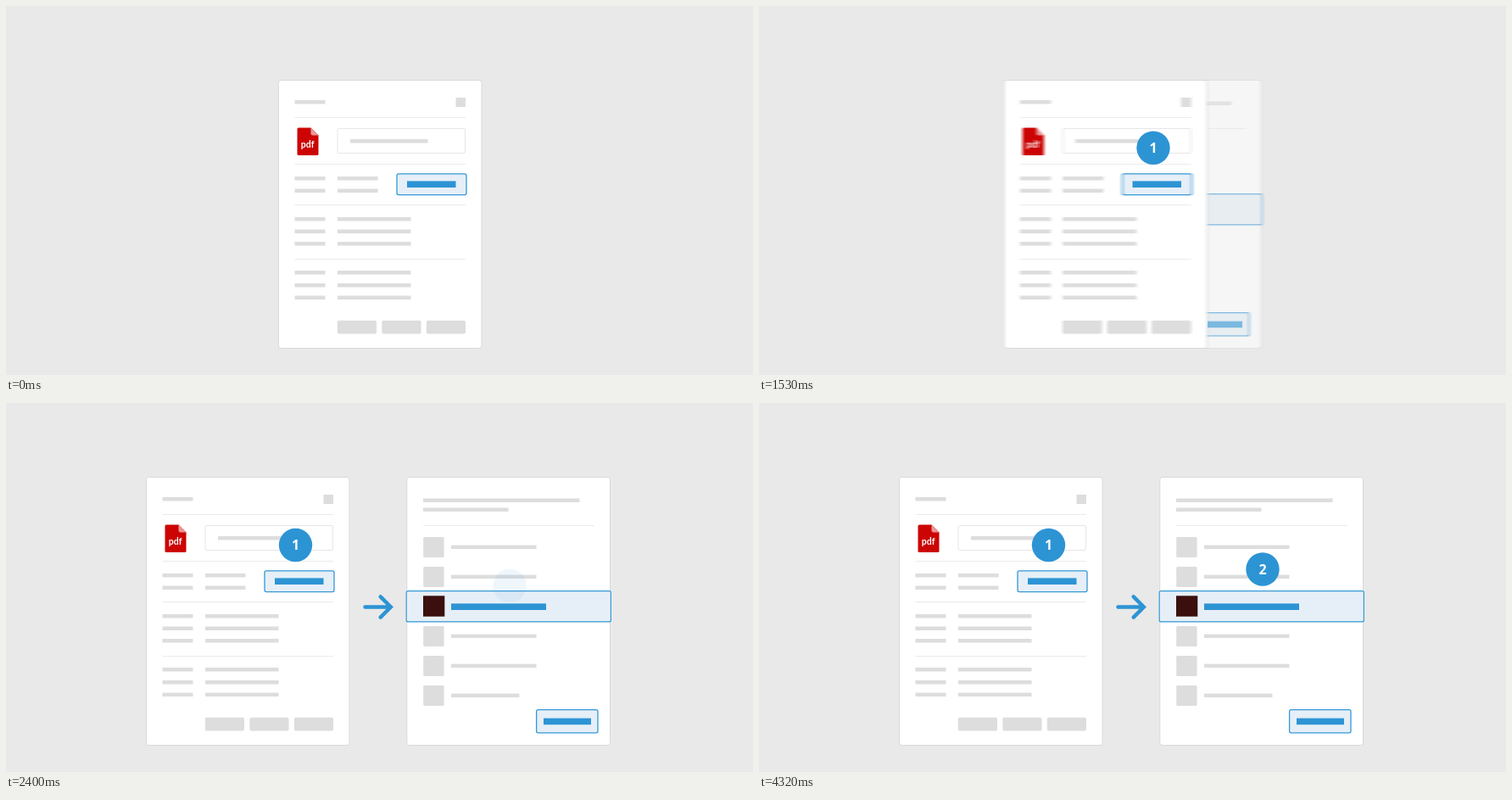
Write an HTML page with a canvas that moves like this. It is 881 by 435 pixels and loops after 4.5 s.

```html
<!DOCTYPE html>
<html lang="en">
<head>
<meta charset="utf-8">
<title>Choose an app for a file</title>
<style>
html, body { margin: 0; width: 100%; height: 100%; overflow: hidden; background: #e9e9e9; }
canvas { display: block; }
</style>
</head>
<body>
<canvas id="stage" width="881" height="435"></canvas>
<script>
const W = 881, H = 435, LOOP = 4500, TICK = 30;
const BG = '#e9e9e9', GREY = '#dddddd', RULE = '#ebebeb';
const BLUE = '#2d94d4', PALE = '#e6eff7';
const ctx = document.getElementById('stage').getContext('2d');

function layer(paint) {
  const c = document.createElement('canvas');
  c.width = W;
  c.height = H;
  const g = c.getContext('2d');
  if (paint) paint(g);
  return { canvas: c, g };
}

// Shapes are given by their left, top, right and bottom edges.
function bar(g, x1, y1, x2, y2, color = GREY) {
  g.fillStyle = color;
  g.fillRect(x1, y1, x2 - x1, y2 - y1);
}

function box(g, x1, y1, x2, y2, r, fill, stroke, lw = 1) {
  g.beginPath();
  g.roundRect(x1, y1, x2 - x1, y2 - y1, r);
  if (fill) {
    g.fillStyle = fill;
    g.fill();
  }
  if (stroke) {
    g.strokeStyle = stroke;
    g.lineWidth = lw;
    g.stroke();
  }
}

function poly(g, color, ...pts) {
  g.beginPath();
  for (let i = 0; i < pts.length; i += 2) g.lineTo(pts[i], pts[i + 1]);
  g.closePath();
  g.fillStyle = color;
  g.fill();
}

function fileIcon(g) {
  g.beginPath();
  g.moveTo(345, 143.5);
  g.lineTo(359.5, 143.5);
  g.lineTo(368.5, 152.5);
  g.lineTo(368.5, 174.5);
  g.arcTo(368.5, 176, 367, 176, 1.5);
  g.lineTo(345, 176);
  g.arcTo(343.5, 176, 343.5, 174.5, 1.5);
  g.lineTo(343.5, 145);
  g.arcTo(343.5, 143.5, 345, 143.5, 1.5);
  g.fillStyle = '#cc0404';
  g.fill();
  poly(g, '#ea9696', 359.5, 143.5, 368.5, 152.5, 361, 152.5, 359.5, 151);
  g.fillStyle = '#fff';
  g.font = 'bold 10.5px Lato, "Open Sans", sans-serif';
  g.textAlign = 'center';
  g.fillText('pdf', 355.7, 167);
}

// The details card, at its opening place
const card = layer(g => {
  box(g, 321.5, 87.5, 561, 403.5, 3, '#fff', '#d9d9d9');
  bar(g, 340.5, 111, 376.5, 115.5);
  bar(g, 530.5, 108, 542, 119);
  for (const y of [131, 186, 234, 298]) bar(g, 340.5, y, 542, y + 1, RULE);
  fileIcon(g);
  box(g, 391, 144.5, 541.5, 173.5, 1.5, null, '#e6e6e6');
  bar(g, 406, 157, 497.5, 161.5);
  const row = (y, right) => {
    bar(g, 340.5, y, 376.5, y + 4.5);
    bar(g, 391, y, right, y + 4.5);
  };
  for (const y of [201, 215.5]) row(y, 438.5);
  for (const y of [249, 263.5, 278, 312, 327, 341.5]) row(y, 477.5);
  for (let i = 0; i < 3; i++) {
    const x = 390.8 + i * 52.5;
    box(g, x, 370.8, x + 46.2, 386.6, 2, GREY);
  }
  box(g, 461, 197.8, 543, 222.6, 2, PALE, '#3598d8', 1.3);
});

// The app list, at its closing place
const panel = layer(g => {
  box(g, 472.8, 87.5, 712.5, 403.5, 3, '#fff', '#d9d9d9');
  bar(g, 492, 112.5, 676.5, 117);
  bar(g, 492, 123.5, 592.5, 128);
  bar(g, 492, 144, 693.5, 145, RULE);
  for (let i = 0; i < 6; i++) {
    if (i === 2) continue;
    const y = 158 + i * 35;
    box(g, 492.2, y, 516.6, y + 24, 1.5, GREY);
    bar(g, 525, y + 9.6, i === 5 ? 605.5 : 625.5, y + 14);
  }
  box(g, 472.2, 221.7, 713.4, 257.9, 2, PALE, '#3598d8', 1.2);
  bar(g, 492, 227.3, 517.3, 251.7, '#3a0f0e');
  box(g, 625.6, 361.6, 698, 388.8, 2, PALE, '#3598d8', 1.3);
});

const SLIDE = { start: 1181, length: 808, a: 0.85, b: 0.18 };
const CARD_DX = -156, PANEL_DX = 151.5, ARROW_DX = 104;
const clamp = v => Math.min(1, Math.max(0, v));

// Cubic bezier ease with handles (a, 0) and (b, 1)
function slide(t) {
  const { start, length, a, b } = SLIDE;
  const x = clamp((t - start) / length);
  if (x === 0 || x === 1) return x;
  let lo = 0, hi = 1, s;
  for (let i = 0; i < 30; i++) {
    s = (lo + hi) / 2;
    const q = 1 - s;
    if (3 * a * q * q * s + 3 * b * q * s * s + s * s * s < x) lo = s;
    else hi = s;
  }
  return s * s * (3 - 2 * s);
}

function panelAlpha(t) {
  const u = clamp((t - 1350) / 510);
  return 1 - (1 - u) * (1 - u);
}

function arrow(g, dx) {
  g.save();
  g.translate(dx, 0);
  g.strokeStyle = BLUE;
  g.lineWidth = 4.5;
  g.lineCap = 'round';
  g.beginPath();
  g.moveTo(423.5, 240.5);
  g.lineTo(453, 240.5);
  g.moveTo(441.7, 228.3);
  g.lineTo(453.8, 240.5);
  g.lineTo(441.7, 252.7);
  g.stroke();
  g.restore();
}

function drawCards(g, p, alpha) {
  g.fillStyle = BG;
  g.fillRect(0, 0, W, H);
  g.globalAlpha = alpha;
  g.drawImage(panel.canvas, (p - 1) * PANEL_DX, 0);
  g.globalAlpha = 1;
  if (p > 0.5) arrow(g, (p - 1) * ARROW_DX);
  g.drawImage(card.canvas, p * CARD_DX, 0);
}

// Averages the cards over the open shutter while they move fast
const scratch = layer();
const SHUTTER = 13;
function drawBlurred(t, alpha) {
  const spread = slide(t + SHUTTER / 2) - slide(t - SHUTTER / 2);
  const n = spread < 0.008 ? 1 : Math.min(16, Math.ceil(spread * -CARD_DX) + 3);
  for (let i = 0; i < n; i++) {
    const dt = n > 1 ? SHUTTER * (i / (n - 1) - 0.5) : 0;
    drawCards(scratch.g, slide(t + dt), alpha);
    ctx.globalAlpha = 1 / (i + 1);
    ctx.drawImage(scratch.canvas, 0, 0);
  }
  ctx.globalAlpha = 1;
}

// Solid labels stay sharp during the slide
function drawLabels(p, alpha) {
  const edge = 561.5 + p * CARD_DX, dx = (p - 1) * PANEL_DX;
  ctx.save();
  ctx.beginPath();
  ctx.rect(edge, 0, W - edge, H);
  ctx.clip();
  ctx.globalAlpha = alpha;
  bar(ctx, 525 + dx, 236.4, 637 + dx, 244, BLUE);
  bar(ctx, 634 + dx, 371.6, 690 + dx, 379.2, BLUE);
  ctx.restore();
  const cx = p * CARD_DX;
  bar(ctx, 473 + cx, 206.4, 530.5 + cx, 214, BLUE);
}

// Rises while fading in, then rings out
const RISE = 200;
function badge(text, x, y, age) {
  if (age <= 0) return;
  const k = clamp(age / RISE), s = Math.max(0, age - RISE) / 1000;
  const dy = 20.8 * (1 - k) - 3.2 * Math.sin(4 * Math.PI * s) * Math.exp(-3 * s);
  ctx.save();
  ctx.globalAlpha = k;
  ctx.translate(x, y + dy);
  ctx.beginPath();
  ctx.arc(0, 0, 19.7, 0, 2 * Math.PI);
  ctx.fillStyle = BLUE;
  ctx.fill();
  ctx.fillStyle = '#fff';
  ctx.font = 'bold 16px "Open Sans", "Noto Sans", sans-serif';
  ctx.textAlign = 'center';
  ctx.fillText(text, 0, 5.9);
  ctx.restore();
}

function draw(t) {
  const p = slide(t), alpha = panelAlpha(t);
  drawBlurred(t, alpha);
  drawLabels(p, alpha);
  badge('1', 497.5 + p * CARD_DX, 167.5, t - 795);
  badge('2', 594, 196, t - 2385);
}

const begin = performance.now();
let shown = -1;
function loop() {
  const t = Math.floor(((performance.now() - begin) % LOOP) / TICK) * TICK;
  if (t !== shown) {
    draw(t);
    shown = t;
  }
  requestAnimationFrame(loop);
}
loop();
</script>
</body>
</html>
```
